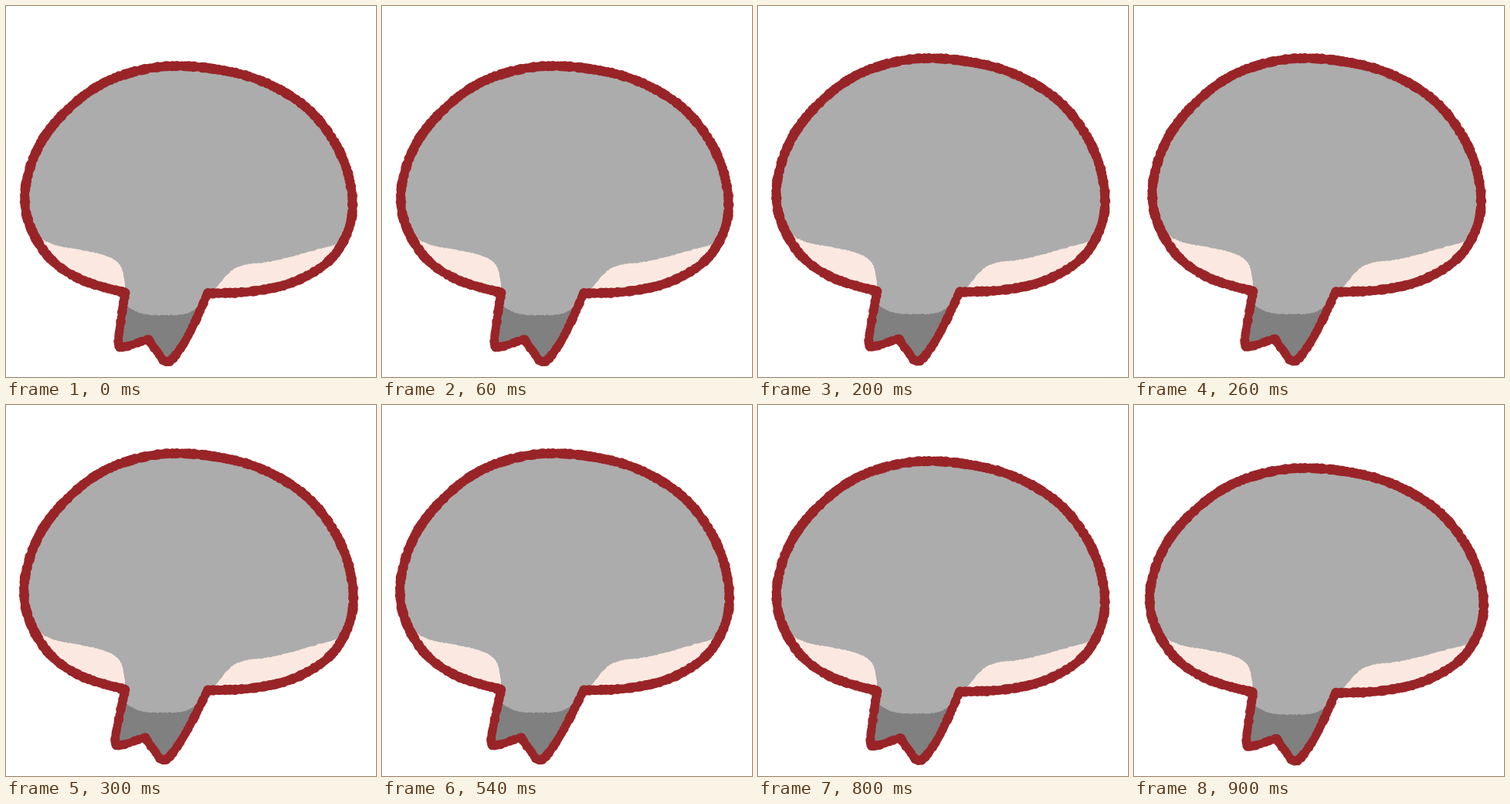
These frames come from a looping animation (479x480 px, 1000 ms). An HTML page with a canvas:

```html
<!DOCTYPE html>
<html lang="en">
<head>
<meta charset="utf-8">
<title>Breathing blob</title>
<style>
  html, body { margin: 0; width: 100%; height: 100%; overflow: hidden; background: #fff; }
  canvas { display: block; width: 100vw; height: 100vh; }
</style>
</head>
<body>
<canvas id="stage" width="479" height="480"></canvas>
<script>
const ctx = document.getElementById('stage').getContext('2d');
const NECK = 372, TOP = 78, MID = 237, HALF = 212;
const RED = '#992427', GREY = '#acacac', DARK = '#808080', CREAM = '#fbe9e1';
const STEP = 100, STEPS = 10, SQUASH = -0.8;

let seed = 7129;
function rnd() {
  seed = (seed * 16807) % 2147483647;
  return seed / 2147483647;
}
const jitter = size => (rnd() - 0.5) * size;

// One coordinate of a Catmull-Rom segment from b to c
function spline(a, b, c, d, t) {
  const linear = (c - a) * t;
  const square = (2 * a - 5 * b + 4 * c - d) * t * t;
  const cube = (3 * b - a - 3 * c + d) * t * t * t;
  return (2 * b + linear + square + cube) / 2;
}

// Smooth curve through the points, sampled about once per pixel
function curve(pts) {
  const out = [];
  const last = pts.length - 1;
  for (let i = 0; i < last; i++) {
    const b = pts[i], c = pts[i + 1];
    const a = pts[Math.max(0, i - 1)], d = pts[Math.min(last, i + 2)];
    const n = Math.ceil(Math.hypot(c[0] - b[0], c[1] - b[1]));
    for (let k = 0; k < n; k++) {
      const t = k / n;
      out.push([spline(a[0], b[0], c[0], d[0], t), spline(a[1], b[1], c[1], d[1], t)]);
    }
  }
  out.push(pts[last]);
  return out;
}

const roughCurve = pts => curve(pts).map(([x, y]) => [x + jitter(0.8), y + jitter(1.2)]);

const body = curve([
  [261, 372], [320, 369], [375, 356], [421, 327], [445, 284], [447, 236],
  [428, 181], [386, 129], [320, 93], [237, 78], [170, 84], [109, 110],
  [54, 163], [28, 220], [27, 272], [53, 322], [95, 353], [154, 371]
]);
const tail = [
  ...curve([[154, 372], [145.5, 434], [153, 441], [184, 431]]),
  ...curve([[184, 431], [194, 445], [209, 460.5], [228, 440], [244, 410], [261, 372]])
];
// Each dab: x, y, radius
const outline = [...body, ...tail].map(([x, y]) => [
  x + jitter(0.5),
  y + jitter(0.5),
  (y > NECK ? 5.2 : 5.6) + 1.2 * rnd() ** 3
]);

const leftPatch = [
  ...roughCurve([[30, 289], [60, 308], [122, 321], [148, 336], [155, 371]]),
  [0, 372]
];
const rightPatch = [
  ...roughCurve([[267, 371], [288, 346], [308, 335], [350, 329], [440, 305]]),
  [479, 372]
];
const tailTip = [
  ...roughCurve([[148, 384], [175, 397.5], [205, 400], [235, 397.5], [258, 383]]),
  [265, 470], [130, 470]
];

// Rise in three steps, hold, sink back, then squash
function liftAt(ms) {
  const step = Math.floor(Math.round(ms) / STEP) % STEPS;
  return step === STEPS - 1 ? SQUASH : Math.min(3, step, STEPS - 1 - step);
}

function poseFor(lift) {
  const top = TOP - 5 * lift;
  const base = NECK - 0.9 * lift;
  return {
    base,
    stretch: (base - top) / (NECK - TOP),
    side: lift < 0 ? -5 * lift : lift / 3,
    sway: -2.1 * Math.max(0, lift - 1)
  };
}

function warp([x, y], pose) {
  if (y <= NECK) {
    const d = (x - MID) / HALF;
    return [x + pose.side * d * Math.abs(d), pose.base + (y - NECK) * pose.stretch];
  }
  const t = Math.min(1, (y - NECK) / 60);
  return [x + pose.sway * t, y + (pose.base - NECK) * (1 - 0.6 * t)];
}

function trace(pts, pose) {
  ctx.beginPath();
  for (const p of pts) ctx.lineTo(...warp(p, pose));
  ctx.closePath();
}

function fill(pts, pose, color) {
  trace(pts, pose);
  ctx.fillStyle = color;
  ctx.fill();
}

function draw(pose) {
  ctx.clearRect(0, 0, 479, 480);

  ctx.save();
  trace(outline, pose);
  ctx.clip();
  fill(outline, pose, GREY);
  fill(leftPatch, pose, CREAM);
  fill(rightPatch, pose, CREAM);
  fill(tailTip, pose, DARK);
  ctx.restore();

  // Rough brush line built from overlapping dabs
  ctx.beginPath();
  for (const dab of outline) {
    const [x, y] = warp(dab, pose);
    ctx.moveTo(x + dab[2], y);
    ctx.arc(x, y, dab[2], 0, Math.PI * 2);
  }
  ctx.fillStyle = RED;
  ctx.fill();
}

const start = performance.now();
function tick() {
  draw(poseFor(liftAt(performance.now() - start)));
  requestAnimationFrame(tick);
}
tick();
</script>
</body>
</html>
```
